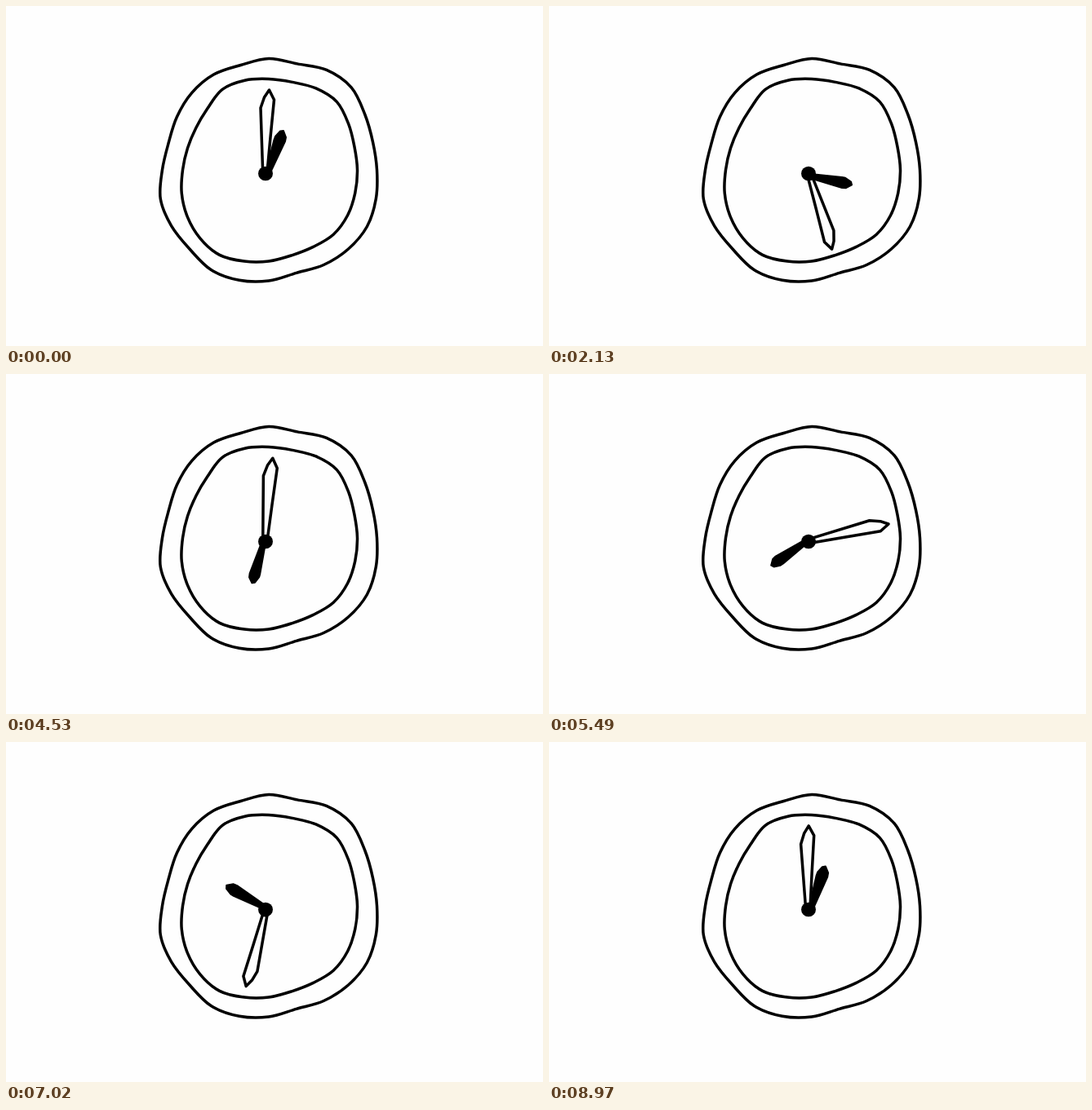
An HTML page that plays this animation: 658 by 417 pixels, repeating every 9000 ms.

```html
<!DOCTYPE html>
<html lang="en">
<head>
<meta charset="utf-8">
<title>Clock</title>
<style>
  html, body { margin: 0; width: 100%; height: 100%; overflow: hidden; background: #fefefe; }
  svg { display: block; width: 658px; height: 417px; }
  path { stroke: #000; stroke-linejoin: round; stroke-linecap: round; vector-effect: non-scaling-stroke; }
  .line { fill: none; stroke-width: 3.5; }
  .solid { fill: #000; stroke-width: 2; }
</style>
</head>
<body>
<svg viewBox="0 0 658 417">
  <path id="rim" class="line"/>
  <path id="face" class="line"/>
  <path id="minute" class="line" d="M-3.5-7 L-6-81 L-1.5-94 L4.5-103 L10.5-91 L6-45 L2.5-7Z"/>
  <path id="hour" class="solid" d="M1-5 L10.5-42 L12-46 L18-52.5 L22-53 L25-45 L24-40 L7-4Z"/>
  <ellipse cx="318" cy="205.5" rx="9" ry="8.7"/>
</svg>
<script>
const LOOP = 9000, STEP = 30;
const CENTRE = [322, 201], PIVOT = [318, 206];
const $ = id => document.getElementById(id);
const cosDeg = a => Math.cos(a * Math.PI / 180);
const sinDeg = a => Math.sin(a * Math.PI / 180);

// Wobbly rings: radii at equal angles, clockwise from twelve
const rimRadii = [136.5, 134.7, 141.5, 143, 136, 132, 132.5, 136, 139, 137.5, 134.5, 130.8,
  136, 140, 141.5, 137.2, 137.7, 137.4, 130.5, 127.2, 130, 133.5, 135, 133];
const faceRadii = [111.5, 111.4, 115.5, 118, 112.8, 108.7, 108.5, 109.5, 111.5, 112, 109, 108.5,
  112, 116, 120.5, 118.8, 115.1, 110.5, 105.5, 103, 103, 106.3, 114, 113.7];

// Closed Catmull-Rom curve through the ring's points
function ring(radii) {
  const n = radii.length;
  const at = i => {
    const k = (i + n) % n, a = 360 * k / n;
    return [CENTRE[0] + radii[k] * sinDeg(a), CENTRE[1] - radii[k] * cosDeg(a)];
  };
  let d = "M" + at(0);
  for (let i = 0; i < n; i++) {
    const [a, b, c, e] = [at(i - 1), at(i), at(i + 1), at(i + 2)];
    const c1 = b.map((v, k) => v + (c[k] - a[k]) / 6);
    const c2 = c.map((v, k) => v - (e[k] - b[k]) / 6);
    d += `C${c1} ${c2} ${c}`;
  }
  return d + "Z";
}

// Each hand turns steadily, lags a little near six and reaches further towards twelve
const hands = [
  { id: "minute", start: 2.5, turns: 2, lag: 5.1, stretch: 0.034 },
  { id: "hour", start: 23, turns: 1, lag: 3, stretch: 0.042 },
];

function pose({ id, start, turns, lag, stretch }, progress) {
  const steady = start + 360 * turns * progress;
  const angle = steady - lag * (cosDeg(start) - cosDeg(steady));
  const reach = a => 1 + stretch * cosDeg(a);
  $(id).setAttribute("transform",
    `translate(${PIVOT}) rotate(${angle - start}) scale(${reach(angle) / reach(start)})`);
}

function draw(time) {
  const t = Math.floor((time % LOOP) / STEP) * STEP;
  hands.forEach(hand => pose(hand, t / LOOP));
}

$("rim").setAttribute("d", ring(rimRadii));
$("face").setAttribute("d", ring(faceRadii));

const begin = performance.now();
function tick() {
  draw(performance.now() - begin);
  requestAnimationFrame(tick);
}
draw(0);
requestAnimationFrame(tick);
</script>
</body>
</html>
```
